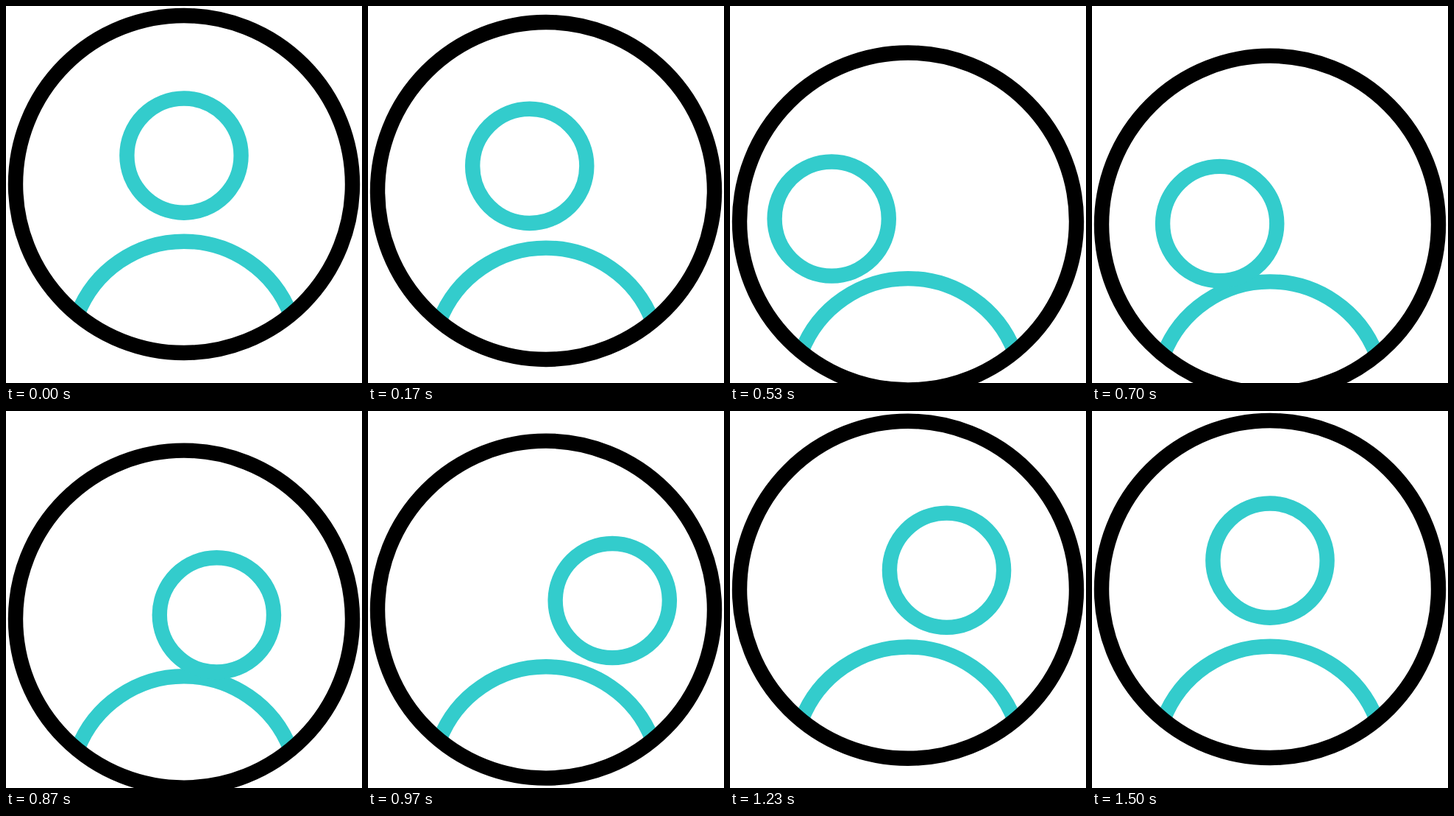
Write an HTML page that moves like this. It is 484 px wide and 512 px high and loops after 2000 ms.

```html
<!DOCTYPE html>
<html lang="en">
<head>
<meta charset="utf-8">
<title>Profile icon</title>
<style>
  html, body { margin: 0; width: 100%; height: 100%; overflow: hidden; background: #fff; }
  svg { display: block; width: 484px; height: 512px; }
  svg * { fill: none; stroke-width: 20.4; }
  .accent { stroke: #33cccc; }
  .ring { stroke: #000; }
</style>
</head>
<body>
<svg viewBox="0 0 484 512">
  <g id="icon">
    <path class="accent" d="M97.1 419.1A155.3 155.3 0 0 1 386.9 419.1"/>
    <circle id="head" class="accent" cx="242" cy="203.1" r="77.6"/>
    <circle class="ring" cx="242" cy="242" r="229"/>
  </g>
</svg>
<script>
  const LOOP = 2000;
  const LEFT = -104.5, RIGHT = 94.6, DROP = 55.5;
  const icon = document.getElementById('icon');
  const head = document.getElementById('head');

  // Eased progress between two ticks (30 per second).
  const ease = (k, from, to) => {
    const u = Math.min(1, Math.max(0, (k - from) / (to - from)));
    return u * u * (3 - 2 * u);
  };

  // Height of the head along its curved way out and back.
  const leftDip = x => -0.2087 * x + 0.00128 * x * x;
  const rightDip = x => 0.1864 * x + 0.00094 * x * x;

  function headAt(k) {
    if (k < 17.6) {
      const x = LEFT * ease(k, 0, 16.8);
      return [x, leftDip(x)];
    }
    if (k < 30.1) {
      const p = ease(k, 17.6, 30.1);
      const a = leftDip(LEFT), b = rightDip(RIGHT);
      return [LEFT + (RIGHT - LEFT) * p, a + (b - a) * p + 25 * p * (1 - p)];
    }
    const x = RIGHT * (1 - ease(k, 30.1, 45));
    return [x, rightDip(x)];
  }

  const move = (el, x, y) =>
    el.setAttribute('transform', `translate(${x.toFixed(2)} ${y.toFixed(2)})`);

  function draw(ms) {
    // Ticks fall on whole hundredths of a second.
    const k = Math.floor((Math.floor(ms / 10) + 0.5) * 0.3);
    move(icon, 0, DROP * (ease(k, 0, 19.65) - ease(k, 19.65, 38.3)));
    move(head, ...headAt(k));
  }

  const start = performance.now();
  function loop() {
    draw((performance.now() - start) % LOOP);
    requestAnimationFrame(loop);
  }
  loop();
</script>
</body>
</html>
```
